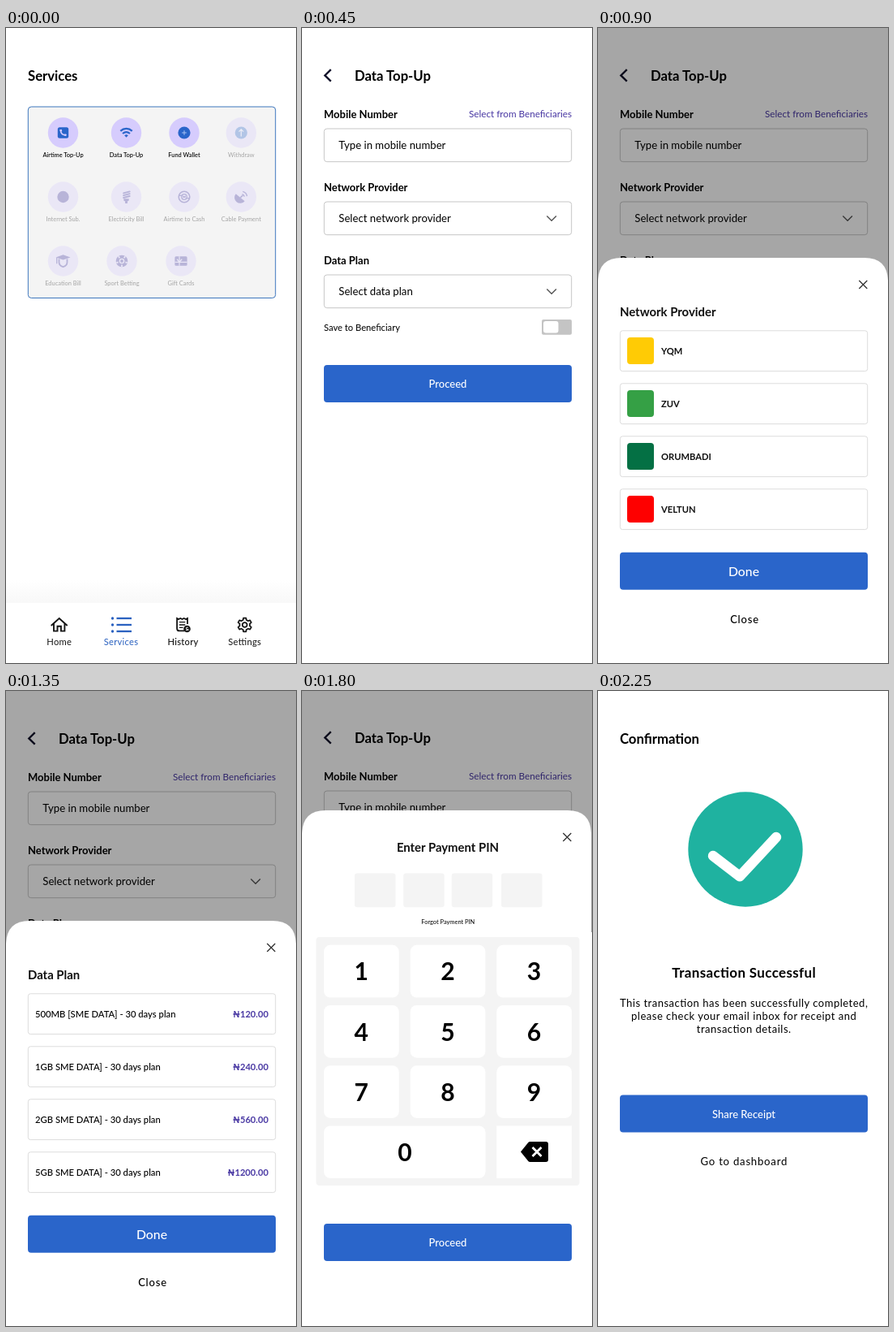
These frames come from a looping animation (358 px wide and 782 px high, 2700 ms). An HTML page:

```html
<!DOCTYPE html>
<html lang="en">
<head>
<meta charset="utf-8">
<title>Data top-up flow</title>
<style>
  html, body { margin: 0; width: 100%; height: 100%; overflow: hidden; background: #fff; }
  svg { display: block; width: 358px; height: 782px; }
  text { font-family: Lato, Carlito, sans-serif; font-feature-settings: "liga" 1, "kern" 1; }
</style>
</head>
<body>
<svg id="stage" viewBox="0 0 358 782" xmlns="http://www.w3.org/2000/svg"></svg>
<script>
const STEP = 450;
const BLUE = '#2a65ca', PURPLE = '#4938a3', INK = '#000', PALE = '#f4f4f4';

// Drawing helpers
const text = (x, y, str, size, o = {}) =>
  `<text x="${x}" y="${y}" font-size="${size}" font-weight="${o.w || 400}" fill="${o.fill || INK}"` +
  ` text-anchor="${o.a || 'start'}" letter-spacing="${o.ls || 0}">${str}</text>`;
const mid = (x, y, str, size, o = {}) => text(x, y, str, size, { ...o, a: 'middle' });
const rect = (x, y, w, h, r, fill, stroke = 'none') =>
  `<rect x="${x}" y="${y}" width="${w}" height="${h}" rx="${r}" fill="${fill}" stroke="${stroke}"/>`;
const disc = (x, y, r, fill) => `<circle cx="${x}" cy="${y}" r="${r}" fill="${fill}"/>`;
const ring = (x, y, r, color, w) =>
  `<circle cx="${x}" cy="${y}" r="${r}" fill="none" stroke="${color}" stroke-width="${w}"/>`;
const line = (d, color, w, cap = 'butt') =>
  `<path d="${d}" fill="none" stroke="${color}" stroke-width="${w}" stroke-linecap="${cap}" stroke-linejoin="${cap === 'round' ? 'round' : 'miter'}"/>`;
const shape = (d, fill) => `<path d="${d}" fill="${fill}"/>`;
const at = (x, y, body, opacity = 1) =>
  `<g transform="translate(${x} ${y})" opacity="${opacity}">${body}</g>`;

const button = (y, label, size = 13, drop = 28) =>
  rect(27, y, 306, 46, 4, BLUE) + mid(180, y + drop, label, size, { w: 500, fill: '#fff' });
const cross = (x, y) =>
  line(`M${x - 5} ${y - 5}l10 10m0 -10l-10 10`, '#333', 1.3);

// Service icons, each around its own centre
const VIOLET = '#3b2fa0', LILAC = '#d6ccfd';
const icons = {
  phone: rect(-6.7, -6.7, 13.4, 13.4, 2.5, BLUE) +
    line('M-3 -3.4C-3 0.8 -0.8 3 3.4 3', LILAC, 1.6) +
    line('M-3.1 -4L-2.4 -1.7M1.7 2.4L4 3.1', LILAC, 2.5),
  wifi: line('M-7.2 -2.2C-3 -6 3 -6 7.2 -2.2', BLUE, 2.3) +
    line('M-4.5 1C-1.8 -1.3 1.8 -1.3 4.5 1', BLUE, 2.2) +
    shape('M-2.3 3.2Q0 1.4 2.3 3.2L0 5.8Z', BLUE),
  plus: disc(0, 0, 7.6, BLUE) + line('M-2.8 0h5.6M0 -2.8v5.6', '#a9c2f2', 1),
  up: disc(0, 0, 7.6, BLUE) + line('M0 4.5V-4M-2.8 -1.4L0 -4.2L2.8 -1.4', '#e4e4ff', 1.2),
  net: disc(0, 0, 7.2, VIOLET),
  bulb: line('M-3.4 -4.6L4.2 -6.6M-3.4 -1.8L4.2 -3.8M-3.4 1L4.2 -1', VIOLET, 1.9, 'round') +
    shape('M-3.2 2.2H3.2V4.6L1.4 5.6V8H-1.4V5.6L-3.2 4.6Z', VIOLET),
  cash: ring(0, 0, 6.8, VIOLET, 1.6) + ring(0, 0, 3.3, VIOLET, 1.2) +
    line('M-6.5 -1.6H-2.4M2.4 1.6H6.5M-2 -1L2 1M-2 1L2 -1', VIOLET, 1.2),
  dish: shape('M-6.6 -3.8A7 7 0 0 0 4.4 5.2Z', VIOLET) + line('M-1 0.8L2 -1.8', VIOLET, 1.6) +
    line('M1.2 -3.4A4 4 0 0 1 4 -0.4M2 -6.6A7 7 0 0 1 7.2 -0.8', VIOLET, 1.4),
  cap: shape('M-9 -4.4L0 -7.8L9 -4.4L0 -1.4Z', VIOLET) + line('M-7.8 -4V3.2', VIOLET, 1.3) +
    line('M-5 -2.5V1.4C-5 4.4 -2.4 6.4 0 7.2C2.4 6.4 5 4.4 5 1.4V-2.5', VIOLET, 1.8),
  chip: ring(0, 0, 5.3, VIOLET, 4) + disc(0, 0, 1.9, VIOLET) +
    [0, 1, 2, 3, 4].map(i => `<path d="M0 -7V-4.6" stroke="${LILAC}" stroke-width="1.8" transform="rotate(${i * 72 + 36})"/>`).join(''),
  gift: rect(-7.6, -5.8, 15.2, 11.6, 1.5, VIOLET) +
    line('M-7.6 1.4H7.6M-2 -5.8V5.8', LILAC, 1.2) +
    line('M-2 1.2L-5 -2.4M-2 1.2L1.2 -2.4', LILAC, 1.4)
};

const services = [
  [70.5, 129, 'phone', 'Airtime Top-Up', 1], [148.5, 129, 'wifi', 'Data Top-Up', 1],
  [220, 129, 'plus', 'Fund Wallet', 1], [290.3, 129, 'up', 'Withdraw'],
  [70.5, 208, 'net', 'Internet Sub.'], [148.5, 208, 'bulb', 'Electricity Bill'],
  [220, 208, 'cash', 'Airtime to Cash'], [290.3, 208, 'dish', 'Cable Payment'],
  [70.5, 287, 'cap', 'Education Bill'], [143, 287, 'chip', 'Sport Betting'],
  [216, 287, 'gift', 'Gift Cards']
];

function gear(teeth, outer, inner) {
  const pts = [];
  for (let i = 0; i < teeth; i++)
    for (const [off, r] of [[-.3, inner], [-.18, outer], [.18, outer], [.3, inner]]) {
      const a = (i + off) / teeth * 2 * Math.PI - Math.PI / 2;
      pts.push((r * Math.cos(a)).toFixed(2) + ' ' + (r * Math.sin(a)).toFixed(2));
    }
  return 'M' + pts.join('L') + 'Z';
}

function navBar() {
  const blue = '#2b62c0', black = '#151515';
  const home = line('M-10 1L0 -8L10 1M-6.7 -1.5V7.6H-2.2V1.8H2.2V7.6H6.7V-1.5', black, 1.9);
  const list = [-8, 0, 8].map(y => disc(-10.5, y, 1.7, blue) + line(`M-5.5 ${y}H13`, blue, 2.3)).join('');
  const receipt = line('M5.5 -1V-8L3.4 -7L1.2 -8L-1 -7L-3.2 -8L-5.4 -7L-7.4 -8V4.4Q-7.4 7.4 -4.4 7.4H2', black, 1.8) +
    line('M-4.6 -3.4H2.8M-4.6 0H2.8M-4.6 3.4H0', black, 1.4) + disc(5, 5, 4.3, black) +
    line('M6.4 3.4Q4 2.4 3.8 4T6.2 5.8T3.6 6.7', '#fff', .9);
  const cog = line(gear(6, 8.6, 6.4), black, 1.8, 'round') + ring(0, 0, 2.9, black, 1.8);
  const tabs = [[65.7, home, 'Home', 760], [142, list, 'Services', 759.5],
    [218.5, receipt, 'History', 759.5], [294.7, cog, 'Settings', 759.5]];
  return rect(0, 680, 358, 28, 0, 'url(#shade)') + rect(0, 708, 358, 74, 0, '#fff') +
    tabs.map(([x, icon, name, y], i) => at(x, 735, icon) +
      mid(x, y, name, 11.2, { ls: .25, fill: i === 1 ? blue : black, w: i === 2 ? 500 : 400 })).join('');
}

function servicesPage() {
  return text(27, 65, 'Services', 16.7, { w: 700 }) +
    rect(27.3, 97, 305.4, 235.5, 4, PALE, '#3d76bd') +
    services.map(([x, y, icon, name, on]) => at(x, y,
      disc(0, 0, 18.7, LILAC) + icons[icon] + mid(0, 30.3, name, 7.45, { w: on ? 500 : 400 }),
      on ? 1 : .32)).join('') + navBar();
}

function field(y, label, hint, select) {
  return text(27, y, label, 13, { w: 700 }) +
    rect(27.3, y + 13, 305.4, 40.7, 3.5, '#fff', '#c6c6c6') +
    text(45.3, y + 38.3, hint, 13.2) +
    (select ? line(`M302.3 ${y + 30.5}l5.8 5.8l5.8 -5.8`, '#555', 1.4) : '');
}

function formPage() {
  return line('M35.7 51.2L28.3 58.4L35.7 65.6', '#14142b', 2.4) +
    text(65, 65, 'Data Top-Up', 16.7, { w: 700 }) +
    field(111, 'Mobile Number', 'Type in mobile number') +
    text(333, 110.3, 'Select from Beneficiaries', 11.7, { a: 'end', fill: PURPLE }) +
    field(201, 'Network Provider', 'Select network provider', true) +
    field(291, 'Data Plan', 'Select data plan', true) +
    text(27, 373, 'Save to Beneficiary', 11.2) +
    rect(296, 359, 37, 18.7, 2, '#c4c4c4') + rect(298, 361, 18.5, 14.6, 3, '#fff') +
    button(415, 'Proceed');
}

const sheet = (top, width = 358) => rect(0, 0, 358, 782, 0, 'rgba(0,0,0,.35)') +
  shape(`M0 782V${top + 28}Q1 ${top} 29 ${top}H${width - 29}Q${width - 1} ${top} ${width} ${top + 28}V782Z`, '#fff');

const picker = (title, rows) => formPage() + sheet(283) + cross(327.3, 316) +
  text(27, 355, title, 14.9, { w: 700, fill: '#111' }) +
  rows.map((row, i) => at(0, 65 * i,
    rect(27.3, 372.8, 305.4, 49.8, 3, '#fff', '#dcdcdc') + row)).join('') +
  button(645.7, 'Done', 15.8, 29.5) + mid(181, 733, 'Close', 13, { w: 500, ls: .8 });

const providers = [['YQM', '#ffcb05'], ['ZUV', '#35a045'], ['ORUMBADI', '#047044'], ['VELTUN', '#fe0000']]
  .map(([name, color]) => rect(36, 381, 33, 33, 4, color) + text(78, 401.7, name, 11.2, { w: 700, fill: '#111' }));

const plans = [['500MB [SME', 120], ['1GB SME', 240], ['2GB SME', 560], ['5GB SME', 1200]]
  .map(([size, price]) => text(36, 401.7, `${size} DATA] - 30 days plan`, 11.25, { w: 500 }) +
    text(324, 401.7, `₦${price}.00`, 11.2, { w: 700, a: 'end', fill: PURPLE }));

function pinPage() {
  const cols = [27, 133.7, 240.3], rowY = r => 312.8 + r * 74.2;
  let keys = '';
  for (let i = 0; i < 9; i++) {
    const x = cols[i % 3], y = rowY(Math.floor(i / 3));
    keys += rect(x, y, 92.7, 64.7, 8, '#fff') + mid(x + 46.2, y + 43.6, i + 1, 30, { w: 700 });
  }
  keys += rect(27, rowY(3), 199.5, 64.7, 8, '#fff') + mid(127, rowY(3) + 43.6, 0, 30, { w: 700 }) +
    rect(240.3, rowY(3), 92.7, 64.7, 0, '#fff') +
    shape('M270 567.5L279.5 555.8Q280.3 555 281.5 555H301Q304 555 304 558V577Q304 580 301 580H281.5Q280.3 580 279.5 579.2Z', INK) +
    line('M284.5 562l11 11m0 -11l-11 11', '#fff', 2.8);
  return at(0, -1, formPage()) + sheet(147, 357) + rect(356, 297, 2, 485, 0, '#fff') +
    cross(327.3, 180) + mid(180, 198.3, 'Enter Payment PIN', 14.9, { w: 700, fill: '#111' }) +
    [65, 125.2, 184.7, 246].map(x => rect(x, 224.5, 50.5, 41.7, 3, PALE)).join('') +
    mid(180.3, 287.4, 'Forgot Payment PIN', 7.45) +
    rect(17.5, 303, 325, 306, 4, PALE) + keys + button(656, 'Proceed');
}

function donePage() {
  const lines = ['This transaction has been successfully completed,',
    'please check your email inbox for receipt and', 'transaction details.'];
  return text(27, 65, 'Confirmation', 16.7, { w: 700 }) +
    disc(182, 195, 70.7, '#1fb2a0') +
    line('M142 203L175 228.3L220 180', '#fff', 12.5, 'round') +
    mid(180.2, 353, 'Transaction Successful', 17, { w: 700, ls: .35 }) +
    lines.map((s, i) => mid(180.2, 388.5 + 16 * i, s, 13, { ls: .5 })).join('') +
    button(497.5, 'Share Receipt') + mid(180.3, 584.3, 'Go to dashboard', 13.2, { ls: .75 });
}

const pages = [servicesPage(), formPage(), picker('Network Provider', providers),
  picker('Data Plan', plans), pinPage(), donePage()];

const stage = document.getElementById('stage');
stage.innerHTML = `<defs><linearGradient id="shade" x2="0" y2="1">
  <stop stop-color="#fff"/><stop offset="1" stop-color="#f8f8f8"/></linearGradient></defs>` +
  rect(0, 0, 358, 782, 0, '#fff') +
  pages.map(p => `<g class="page" display="none">${p}</g>`).join('');
const groups = [...stage.querySelectorAll('.page')];

function show(ms) {
  const now = Math.floor(ms / STEP) % groups.length;
  groups.forEach((g, i) => g.setAttribute('display', i === now ? 'inline' : 'none'));
}

let start;
function tick(t) {
  start ??= t;
  show(t - start);
  requestAnimationFrame(tick);
}
show(0);
requestAnimationFrame(tick);
</script>
</body>
</html>
```
